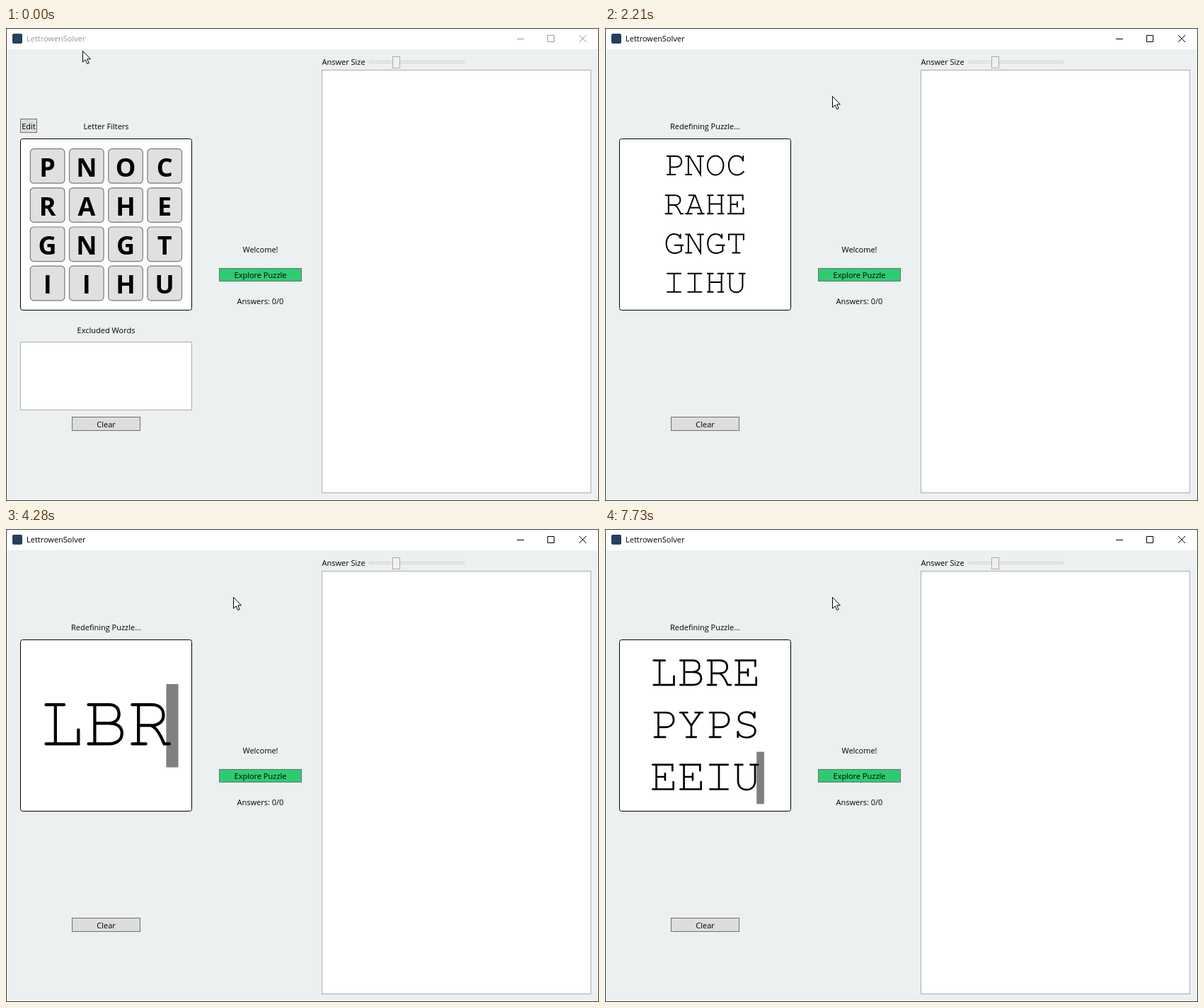
An HTML page for the animation above (8 s loop, 838 by 668 pixels).

```html
<!DOCTYPE html>
<html lang="en">
<head>
<meta charset="utf-8">
<title>LettrowenSolver</title>
<style>
  html, body { margin: 0; height: 100%; overflow: hidden; background: #ecf0f1; }
  svg { display: block; font: 11px "Open Sans", "Noto Sans", sans-serif; }
  .mid { text-anchor: middle; }
  .button { fill: #ddd; stroke: #707070; }
  .field { fill: #fff; stroke: #abadb3; }
  .tile rect { fill: #e0e0e0; stroke: #7a7a7a; stroke-width: 1.2; }
  .tile text { font-size: 36px; font-weight: 700; text-anchor: middle; }
  .glyph { fill: none; stroke: #000; stroke-width: 41; stroke-linecap: round; }
  .layer { fill: transparent; font-family: "Liberation Mono", monospace; }
  #edit.hover rect { fill: #bee6fd; stroke: #3c7fb1; }
</style>
</head>
<body>
<svg width="838" height="668" viewBox="0 0 838 668">
  <rect width="838" height="668" fill="#ecf0f1"/>
  <rect width="838" height="30" fill="#fff"/>
  <rect x="9" y="8" width="14" height="14" rx="2" fill="#25405f"/>
  <g id="bar">
    <text x="29" y="19">LettrowenSolver</text>
    <path d="M722 15.5h10M765.5 10.5h9v9h-9zM810 10l10 10M820 10l-10 10" fill="none" stroke="currentColor"/>
  </g>

  <text x="446.5" y="52">Answer Size</text>
  <rect x="513.5" y="46.5" width="134" height="3" fill="#e7eaea" stroke="#d6d6d6"/>
  <rect x="546.5" y="40.5" width="10" height="16" fill="#f0f0f0" stroke="#acacac"/>
  <rect class="field" x="446.5" y="59.5" width="380" height="597"/>

  <text class="mid" x="359.5" y="317">Welcome!</text>
  <rect x="301.5" y="339.5" width="116" height="18" fill="#2ecc71" stroke="#707070"/>
  <text class="mid" x="359.5" y="353">Explore Puzzle</text>
  <text class="mid" x="359.5" y="390">Answers: 0/0</text>

  <rect class="button" x="93.5" y="549.5" width="96" height="19"/>
  <text class="mid" x="141.5" y="564">Clear</text>
  <rect x="20.5" y="156.5" width="242" height="242" rx="3" fill="#fff" stroke="#000"/>

  <g id="browse">
    <g id="edit">
      <rect class="button" x="20.5" y="128.5" width="23" height="19"/>
      <text class="mid" x="32" y="143">Edit</text>
    </g>
    <text class="mid" x="141.5" y="143">Letter Filters</text>
    <g id="tiles"></g>
    <text class="mid" x="141.5" y="431">Excluded Words</text>
    <rect class="field" x="20.5" y="443.5" width="242" height="96"/>
  </g>
  <g id="redefine">
    <text class="mid" x="141.5" y="143">Redefining Puzzle...</text>
    <g id="editor"></g>
  </g>

  <rect x=".5" y=".5" width="837" height="667" fill="none" stroke="#3c3c3c"/>
  <circle id="halo" cx="31" cy="133" fill="#ff0" fill-opacity=".55"/>
  <path id="cursor" d="M.5.5V16.2L4.2 12.8 6.8 18.6 9.2 17.6 6.7 11.8H11.4Z" fill="#fff" stroke="#000"/>
</svg>
<script>
const $ = id => document.getElementById(id);
const LOOP = 8000, EDIT_AT = 1740, SELECT_AT = 2740;
const START = "PNOC\nRAHE\nGNGT\nIIHU", TYPED = "LBRE\nPYPS\nEEIU";
const KEYS = [3680, 3880, 4210, 4480, 4740, 5340, 5470, 5800, 6270, 6470, 6870, 7070, 7530, 7730];

// Slab lettering as centre lines: 1000 units per em, 600 per character.
const GLYPHS = {
  A: "M130-552H310L510-20M290-552L90-20M35-20H215M385-20H565M155-195H445",
  B: "M60-552H340C430-552 475-500 475-425S420-300 330-300H145M330-300C450-300 515-250 515-165S450-20 340-20H60M145-552V-20",
  C: "M500-552V-410C480-510 400-562 305-562C170-562 85-440 85-300C85-120 180-10 315-10C400-10 470-50 515-105",
  E: "M60-552H490V-425M140-552V-20M60-20H510V-180M140-290H330M330-360V-220",
  G: "M485-552V-430C465-520 390-562 300-562C160-562 75-440 75-290C75-120 175-10 310-10C400-10 470-40 510-75V-240M320-240H560",
  H: "M70-552H230M370-552H530M125-552V-20M475-552V-20M70-20H230M370-20H530M125-300H475",
  I: "M105-552H495M300-552V-20M105-20H495",
  L: "M82-552H328M210-552V-20M82-20H523V-210",
  N: "M40-552H145L465-20V-552M115-552V-20M40-20H205M380-552H550",
  O: "M300-562C430-562 530-440 530-286S430-10 300-10S70-132 70-286S170-562 300-562Z",
  P: "M100-552H350C460-552 517-485 517-395S450-235 340-235H184M184-552V-20M100-20H335",
  R: "M55-552H320C430-552 480-490 480-410S420-270 310-270H140M140-552V-20M55-20H240M310-270C380-250 440-140 490-20H560",
  S: "M475-555V-430C460-520 390-562 300-562C190-562 130-500 130-425C130-330 220-310 300-295C400-275 490-250 490-155C490-60 400-10 300-10C200-10 125-55 110-150V-20",
  T: "M85-400V-552H515V-400M300-552V-20M195-20H405",
  U: "M50-552H215M385-552H550M115-552V-200C115-80 190-10 300-10S485-80 485-200V-552",
  Y: "M55-552H215M385-552H545M105-552L300-270L495-552M300-270V-20M195-20H405"
};

$("tiles").innerHTML = START.split("\n").map((row, j) => [...row].map((c, i) =>
  `<g class="tile" transform="translate(${34.3 + i * 55.2} ${170.6 + j * 55.2})">
    <rect width="48.6" height="48.6" rx="5"/><text x="24.3" y="39">${c}</text></g>`).join("")).join("");

// The text scales to fill a square of 221 px, with room for the caret.
function editorMarkup(text, selected, caret) {
  const rows = text.split("\n"), n = Math.max(...rows.map(r => r.length));
  const size = Math.min(221 / (0.6 * n + 0.328), 221 / 1.1328 / rows.length);
  const step = 0.6 * size, line = 1.1328 * size, thick = 0.164 * size;
  const left = 141.5 - n * step / 2, top = 277.8 - rows.length * line / 2;
  const last = rows.length - 1;
  let out = "";
  if (caret) out += `<rect x="${left + rows[last].length * step - thick / 2}" y="${top + last * line}"
    width="${thick}" height="${line}" fill="#808080"/>`;
  rows.forEach((row, j) => {
    const y = top + j * line, base = y + 0.8333 * size;
    [...row].forEach((c, i) => out += `<path class="glyph" d="${GLYPHS[c]}"
      transform="translate(${left + i * step} ${base}) scale(${size / 1000})"/>`);
    out += `<text class="layer" x="${left}" y="${base}" font-size="${size}">${row}</text>`;
    if (selected) out += `<rect x="${left}" y="${y}" width="${row.length * step + (j < last ? thick : 0)}"
      height="${line}" fill="#0078d7" fill-opacity=".4"/>`;
  });
  return out;
}

const stepped = (t, start, end, steps) =>
  Math.max(0, Math.min(steps, Math.floor((t - start) / (end - start) * steps + 1e-6))) / steps;
const ease = p => p * p * (3 - 2 * p);

let shown = "";
function draw(t) {
  const active = t >= 1670, editing = t >= EDIT_AT;
  const a = ease(stepped(t, 722, 1540, 12)), b = ease(stepped(t, 1670, 2210, 8));
  const x = 108 - 76 * a + 289 * b, y = 32 + 103 * a - 39 * b;
  $("cursor").setAttribute("transform", `translate(${Math.round(x)} ${Math.round(y)})`);
  $("halo").setAttribute("r", t < 1540 || editing ? 0 : active ? 12 : 22);
  $("bar").setAttribute("style", active ? "fill:#000;color:#000" : "fill:#999;color:#999");
  $("edit").setAttribute("class", x < 44 && y > 128 ? "hover" : "");
  $("browse").style.display = editing ? "none" : "";
  $("redefine").style.display = editing ? "" : "none";

  const count = KEYS.filter(k => k <= t).length;
  const markup = editorMarkup(count ? TYPED.slice(0, count) : START, !count && t >= SELECT_AT, count > 0);
  if (markup !== shown) $("editor").innerHTML = shown = markup;
}

const begin = performance.now();
function frame() {
  draw((performance.now() - begin) % LOOP);
  requestAnimationFrame(frame);
}
frame();
</script>
</body>
</html>
```
